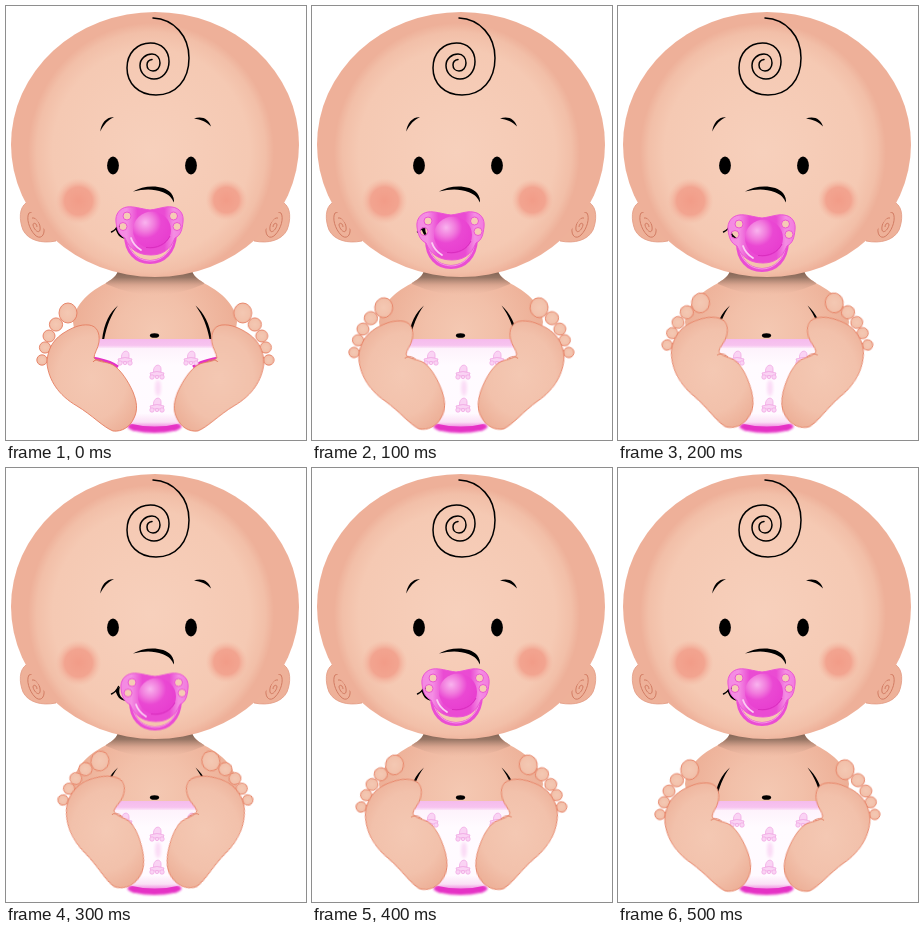
Animation, 300 px wide and 434 px high, one loop 600 ms. Source, as an HTML page:

```html
<!DOCTYPE html>
<html lang="en">
<head>
<meta charset="utf-8">
<title>Baby with pacifier</title>
<style>
html, body { margin: 0; width: 100%; height: 100%; overflow: hidden; background: #fff; }
svg { display: block; width: 100vw; height: 100vh; }
.line { fill: none; stroke: #000; stroke-linecap: round; }
.skin { fill: url(#limb); stroke: #e67e61; stroke-width: .9; }
.leg { transform-origin: 133px 425.6px; animation: kick 600ms step-end infinite; }
.pacifier { animation: suck 600ms step-end infinite; }
@keyframes kick {
  0% { transform: rotate(0deg); }
  16.6667% { transform: rotate(4.6deg); }
  33.3333% { transform: rotate(9.5deg); }
  50% { transform: rotate(14.5deg); }
  66.6667% { transform: rotate(9.5deg); }
  83.3333%, 100% { transform: rotate(4.6deg); }
}
@keyframes suck {
  0% { transform: translate(0, 0); }
  16.6667% { transform: translate(-5px, 5px); }
  33.3333% { transform: translate(0, 8px); }
  50% { transform: translate(5px, 4.5px); }
  66.6667%, 100% { transform: translate(0, 0); }
}
</style>
</head>
<body>
<svg viewBox="0 0 300 434">
  <defs>
    <radialGradient id="face" gradientUnits="userSpaceOnUse" cx="0" cy="0" r="1" gradientTransform="translate(145 146) scale(123 129)">
      <stop offset="0" stop-color="#f7d0bc"/>
      <stop offset=".8" stop-color="#f5c9b3"/>
      <stop offset=".93" stop-color="#f2bfa8"/>
      <stop offset="1" stop-color="#eeb099"/>
    </radialGradient>
    <radialGradient id="torso" gradientUnits="userSpaceOnUse" cx="149" cy="325" r="90">
      <stop offset="0" stop-color="#f4c8b2"/>
      <stop offset=".4" stop-color="#f2c0a9"/>
      <stop offset="1" stop-color="#ecac93"/>
    </radialGradient>
    <radialGradient id="limb" cx=".5" cy=".5" r=".6">
      <stop offset="0" stop-color="#f4c8b3"/>
      <stop offset=".65" stop-color="#f2c1ab"/>
      <stop offset="1" stop-color="#edb098"/>
    </radialGradient>
    <radialGradient id="blush">
      <stop offset="0" stop-color="#f29c88"/>
      <stop offset=".6" stop-color="#f2a08c" stop-opacity=".9"/>
      <stop offset="1" stop-color="#f4b8a2" stop-opacity="0"/>
    </radialGradient>
    <radialGradient id="ball" cx=".32" cy=".3" r=".7">
      <stop offset="0" stop-color="#f9b3ee"/>
      <stop offset=".35" stop-color="#f17add"/>
      <stop offset=".6" stop-color="#ea48d3"/>
      <stop offset="1" stop-color="#e83fd0"/>
    </radialGradient>
    <linearGradient id="shield">
      <stop offset="0" stop-color="#f488e2"/>
      <stop offset=".16" stop-color="#f48ee3"/>
      <stop offset=".32" stop-color="#ea4bd3"/>
      <stop offset=".72" stop-color="#ea4bd3"/>
      <stop offset=".86" stop-color="#f48ee3"/>
      <stop offset="1" stop-color="#f27ade"/>
    </linearGradient>
    <linearGradient id="neck" x2="0" y2="1">
      <stop offset="0" stop-color="#7b5f51"/>
      <stop offset=".3" stop-color="#987665"/>
      <stop offset=".6" stop-color="#d3a08b" stop-opacity=".8"/>
      <stop offset="1" stop-color="#eab8a2" stop-opacity="0"/>
    </linearGradient>
    <linearGradient id="cloth" x2="0" y2="1">
      <stop offset="0" stop-color="#fdeefa"/>
      <stop offset=".3" stop-color="#fffbff"/>
      <stop offset=".85" stop-color="#fffaff"/>
      <stop offset=".95" stop-color="#fae0f5"/>
      <stop offset="1" stop-color="#f294e3"/>
    </linearGradient>
    <linearGradient id="band" x2="0" y2="1">
      <stop offset="0" stop-color="#f5bbed"/>
      <stop offset=".7" stop-color="#f7c4ef"/>
      <stop offset="1" stop-color="#fce6f9"/>
    </linearGradient>
    <filter id="soft" x="-20%" y="-50%" width="140%" height="200%"><feGaussianBlur stdDeviation="1.5"/></filter>
    <filter id="edge" x="-10%" y="-30%" width="120%" height="160%"><feGaussianBlur stdDeviation=".8"/></filter>
    <path id="trunk" d="M112 264C111 274 93 279 82 289C74 296 68 305 67 316C69 336 80 352 96 362H202C219 352 229 336 231 316C230 305 224 296 216 289C205 279 187 274 186 264Z"/>
    <clipPath id="inTrunk"><use href="#trunk"/></clipPath>

    <g id="ear">
      <path d="M20 197C13 202 13 214 17 224C22 234 35 238 50 235L44 205Z" fill="#eeb199" stroke="#e39a82" stroke-width=".8"/>
      <g fill="none" stroke="#d27c63" stroke-width="1">
        <path d="M23 207C30 204 37 213 38 222C39 230 34 234 29 229C23 223 20 212 23 207Z"/>
        <path d="M26 212C31 211 35 219 34 224C33 228 28 224 27 219C27 216 31 217 31 221"/>
      </g>
    </g>

    <g id="foot">
      <circle class="skin" cx="36" cy="354" r="5.2"/>
      <circle class="skin" cx="39" cy="341.5" r="5.6"/>
      <circle class="skin" cx="43" cy="330" r="6"/>
      <circle class="skin" cx="50" cy="318.5" r="6.6"/>
      <ellipse class="skin" cx="62" cy="307" rx="9" ry="10"/>
      <path class="skin" d="M83 319C91 320 94 327 93 336C92 343 88 347 88 352C92 357 100 355 107 359C115 364 122 375 127 386C131 396 132 404 128 412C124 421 116 426 107 425C97 421 86 409 71 400C52 389 43 374 41 358C41 345 46 335 56 328C65 322 74 318 83 319Z"/>
      <path d="M87 356C89 353 94 353 98 356" fill="none" stroke="#e07a5e" stroke-width="1"/>
    </g>

    <g id="pram" fill="#fad3f4" stroke="#f0a9e4" stroke-width=".8">
      <path d="M-3.500 0C-4 -8 4 -9 4 -3V0Z"/>
      <path d="M-7 1Q0 -2 7 1L6 4H-6Z"/>
      <circle cx="-5" cy="5" r="2.200"/>
      <circle cx="0" cy="5" r="1.700"/>
      <circle cx="5" cy="5" r="2.200"/>
    </g>
  </defs>

  <rect width="300" height="434" fill="#fff"/>

  <!-- torso -->
  <use href="#trunk" fill="url(#torso)"/>
  <path d="M100 264H198V278Q149 300 100 278Z" fill="url(#neck)" clip-path="url(#inTrunk)"/>
  <path d="M96 334C98 317 104 306 112 299.500C105 309 101 319 98 334Z"/>
  <path d="M205.500 333C204 318 198 307 189.500 299.500C197 310 201 320 203.500 333Z"/>
  <ellipse cx="148.500" cy="329.500" rx="4.600" ry="2.300"/>

  <!-- diaper -->
  <ellipse cx="148.500" cy="420.500" rx="27" ry="6.500" fill="#e531c5" filter="url(#edge)"/>
  <path d="M93 333H205L213 354C194 357 180 374 176 417Q149 424 121 417C118 374 104 357 86 354Z" fill="url(#cloth)"/>
  <path d="M93 333H205L207 342H91Z" fill="url(#band)"/>
  <path d="M87 352C95 354 104 355 112 361M212 352C204 354 195 355 187 361" fill="none" stroke="#e431c6" stroke-width="3"/>
  <ellipse cx="152" cy="382" rx="3" ry="8" fill="#fbdcf6" filter="url(#soft)"/>
  <use href="#pram" x="119" y="352"/>
  <use href="#pram" x="185" y="352"/>
  <use href="#pram" x="151" y="366"/>
  <use href="#pram" x="151" y="399"/>

  <!-- legs -->
  <g class="leg"><use href="#foot"/></g>
  <g transform="matrix(-1 0 0 1 298.800 0)"><g class="leg"><use href="#foot"/></g></g>

  <!-- head -->
  <use href="#ear"/>
  <use href="#ear" transform="matrix(-1 0 0 1 298 0)"/>
  <ellipse cx="149" cy="138.500" rx="144" ry="132.500" fill="url(#face)"/>
  <circle cx="72.500" cy="195" r="23" fill="url(#blush)"/>
  <circle cx="220.500" cy="194" r="21" fill="url(#blush)"/>
  <path class="line" stroke-width="1.500" d="M147 12C168 13 183 30 183 52C183 74 170 89 150 89C132 89 121 77 121 62C121 47 131 37 144.500 37C156 37 163 45 163 55.500C163 66 156 73 148 73C140 73 134 67 134 59.500C134 52.500 140 48 146 48C151 48 154 52 154 57C154 61.500 151 65 147 65C143 65 141 62 141 59C141 56 143 54 146 53.500"/>
  <path d="M94.300 125.500C95 117 101 110.500 108 111.300C102 114 98 118 94.300 125.500Z"/>
  <path d="M188 112.500C196 109.500 203 113 205 120.500C200 115.500 195 113.500 188 112.500Z"/>
  <ellipse cx="107" cy="159.500" rx="5.900" ry="9"/>
  <ellipse cx="185" cy="159.500" rx="5.900" ry="9"/>
  <path d="M127 185.500C138 178.500 158 178.500 165 187C167.500 190 168.500 194 167.800 196.500C166 192 163 188.500 157 186.200C147 182.500 138 183 127 185.500Z"/>
  <path class="line" stroke-width="1.400" d="M105.500 226Q110 224 112.500 218.500"/>
  <path d="M109.500 222L114 218.500C112 226 114 229 120 233C113.500 232 110.500 228 109.500 222Z"/>

  <!-- pacifier -->
  <g class="pacifier">
    <path d="M120 229C120 246 130 256 144 256C158 256 168 246 169 229" fill="none" stroke="#ea4ed3" stroke-width="4"/>
    <path d="M121 233C123 246 131 254.500 144 255C155 255 164 247 167 236" fill="none" stroke="#f596e6" stroke-width="1"/>
    <path fill="url(#shield)" stroke="#ea55d4" stroke-width="1" fill-rule="evenodd" d="M144 204C153 203 159 200 166 201C174 202 178 208 177 216C176 224 175 229 169 232C164 244 156 249 145 249C133 249 124 244 119 232C113 229 111 224 110 216C109 208 114 202 121 201C128 200 135 203 144 204ZM117 210a4 4 0 1 0 8 0a4 4 0 1 0 -8 0ZM113 220.500a4 4 0 1 0 8 0a4 4 0 1 0 -8 0ZM163.500 210a4 4 0 1 0 8 0a4 4 0 1 0 -8 0ZM167 220.500a4 4 0 1 0 8 0a4 4 0 1 0 -8 0Z"/>
    <ellipse cx="146" cy="224" rx="19" ry="18.500" fill="url(#ball)"/>
    <path d="M125 232C127 238 130 241 135 244" fill="none" stroke="#fbcdf3" stroke-width="1.800" stroke-linecap="round"/>
    <path d="M140 241.500C151 243 160 238 164 230" fill="none" stroke="#d92cbe" stroke-width="1"/>
  </g>
</svg>
</body>
</html>
```
